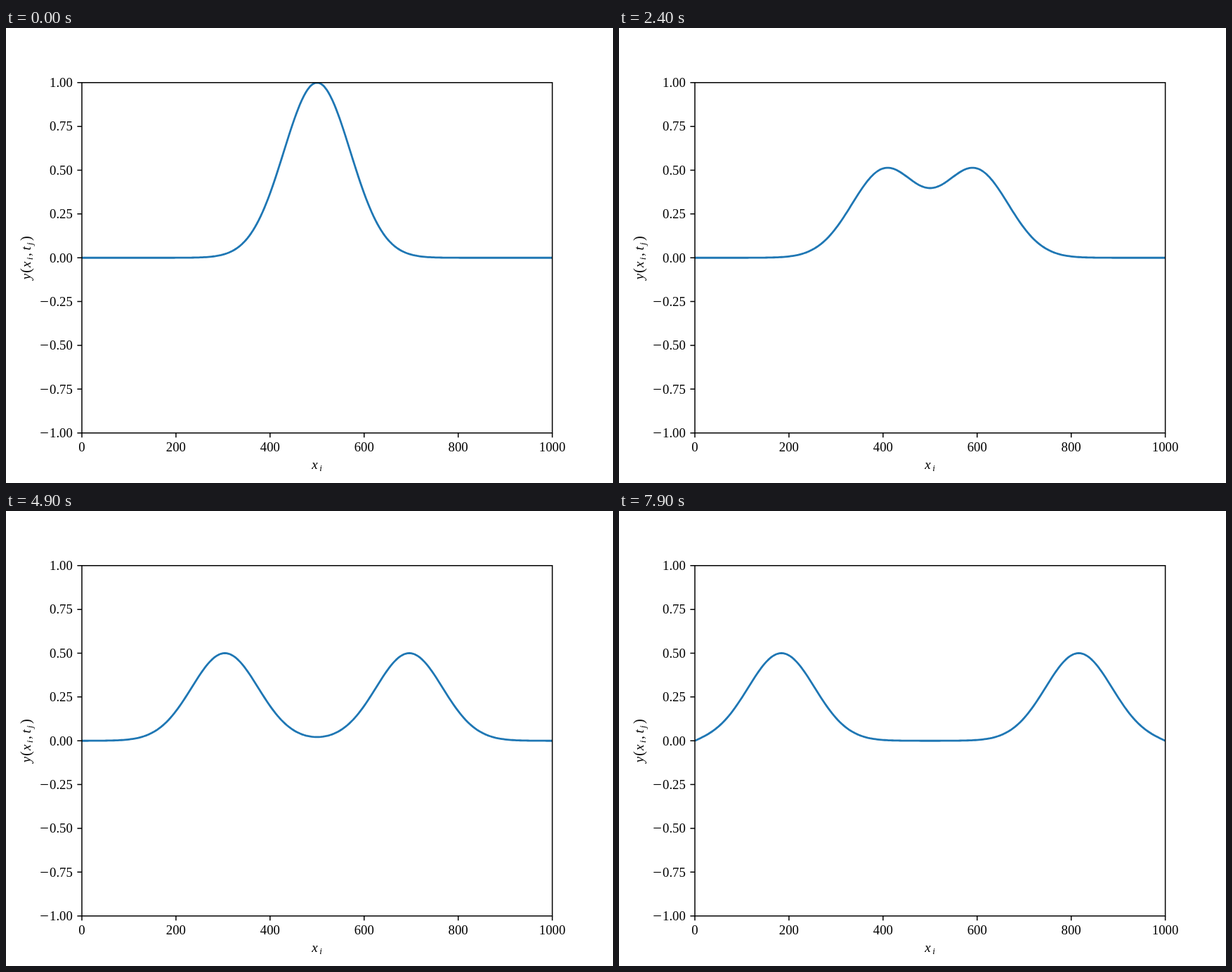
An HTML page for the animation above (8 s loop, 864 by 648 pixels).

```html
<!DOCTYPE html>
<html lang="en">
<head>
<meta charset="utf-8">
<title>Wave on a string</title>
<style>
  html, body { margin: 0; width: 100%; height: 100%; overflow: hidden; background: #fff; }
  svg { display: block; }
  text { font: 18.75px "Liberation Serif", "Times New Roman", serif; fill: #000; }
  .end { text-anchor: end; }
  .mid { text-anchor: middle; }
  .minus { font-size: 22.5px; }
  .var { font-size: 19px; font-style: italic; }
  .sub { font-size: 13.2px; font-style: italic; }
  .paren { font-size: 20px; }
  .axis { fill: none; stroke: #000; stroke-width: 1.5; }
  #wave { fill: none; stroke: #1f77b4; stroke-width: 2.81; stroke-linejoin: round; }
</style>
</head>
<body>
<svg width="864" height="648" viewBox="0 0 864 648">
  <clipPath id="plot"><rect x="108" y="77.76" width="669.6" height="498.96"/></clipPath>
  <path id="wave" clip-path="url(#plot)"/>
  <rect class="axis" x="108" y="77.76" width="669.6" height="498.96"/>
  <path id="ticks" class="axis"/>
  <g id="labels"></g>
  <text y="628"><tspan class="var" x="435.3">x</tspan><tspan class="sub" x="446.3" dy="2.8">i</tspan></text>
  <text transform="translate(34.7 359) rotate(-90)"><tspan class="var" x="0.8">y</tspan><tspan class="paren" x="10.3">(</tspan><tspan class="var" x="18">x</tspan><tspan class="sub" x="28.8" dy="2.8">i</tspan><tspan x="34" dy="-2.8">,</tspan><tspan class="var" x="42.4">t</tspan><tspan class="sub" x="49.8" dy="2.8">j</tspan><tspan class="paren" x="56" dy="-2.8">)</tspan></text>
</svg>
<script>
  const LENGTH = 1000, LOOP = 8000, STEP = 100, SHIFT = 4;
  const $ = id => document.getElementById(id);
  const px = x => 108 + 0.6696 * x;
  const py = y => 327.24 - 249.48 * y;

  function drawAxes() {
    let ticks = "", labels = "";
    for (let x = 0; x <= LENGTH; x += 200) {
      ticks += `M${px(x)} ${py(-1)}v6.56`;
      labels += `<text class="mid" x="${px(x)}" y="603">${x}</text>`;
    }
    for (let y = -1; y <= 1; y += 0.25) {
      const digits = Math.abs(y).toFixed(2);
      const content = y < 0
        ? `<tspan class="minus" dy="1">−</tspan><tspan dx="1" dy="-1">${digits}</tspan>`
        : digits;
      ticks += `M108 ${py(y)}h-6.56`;
      labels += `<text class="end" x="94.87" y="${py(y) + 6.3}">${content}</text>`;
    }
    $("ticks").setAttribute("d", ticks);
    $("labels").innerHTML = labels;
  }

  const pulse = x => Math.exp(-(((x - 500) / 100) ** 2));
  // Odd mirror images keep both ends of the string fixed.
  const extended = x => pulse(x) - pulse(-x) - pulse(2 * LENGTH - x);

  function drawWave(shift) {
    const points = [];
    for (let x = 0; x <= LENGTH; x += 4) {
      const y = (extended(x - shift) + extended(x + shift)) / 2;
      points.push(`${px(x).toFixed(2)} ${py(y).toFixed(2)}`);
    }
    $("wave").setAttribute("d", "M" + points.join("L"));
  }

  const start = performance.now();
  function tick() {
    const time = (performance.now() - start) % LOOP;
    drawWave(SHIFT * Math.floor(time / STEP));
    requestAnimationFrame(tick);
  }

  drawAxes();
  tick();
</script>
</body>
</html>
```
